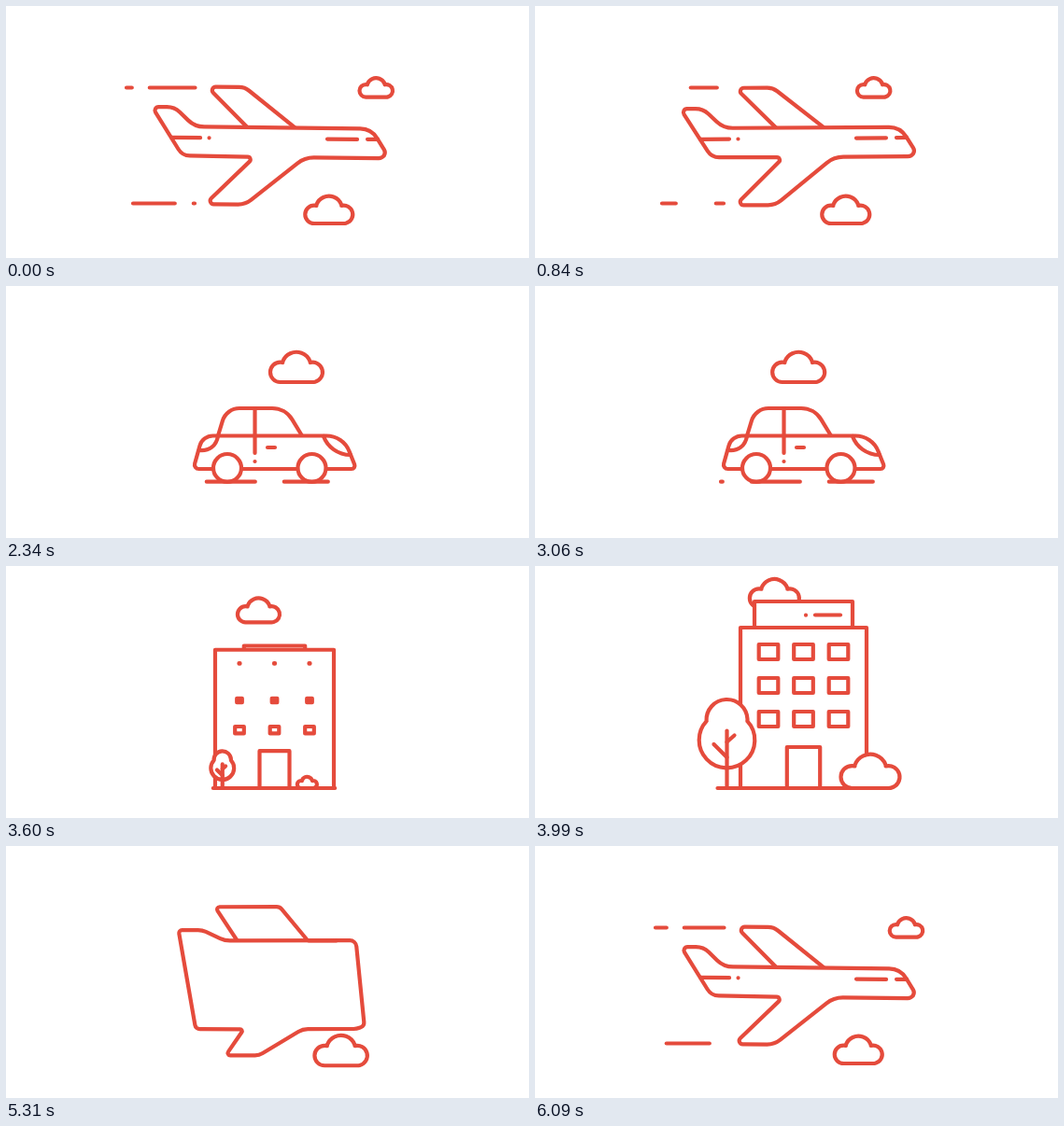
These frames come from a looping animation (560x270 px, 6120 ms). An HTML page with a canvas:

```html
<!DOCTYPE html>
<html lang="en">
<head>
<meta charset="utf-8">
<title>Plane, car, building</title>
<style>
html, body { margin: 0; width: 100%; height: 100%; overflow: hidden; background: #fff; }
canvas { display: block; width: 560px; height: 270px; }
</style>
</head>
<body>
<canvas id="stage"></canvas>
<script>
const LOOP = 6120, INK = '#e54b3c', WEIGHT = 4.2, WIND_SPEED = .2;
const canvas = document.getElementById('stage');
const ctx = canvas.getContext('2d');
const dpr = window.devicePixelRatio || 1;
canvas.width = 560 * dpr;
canvas.height = 270 * dpr;

const clamp = v => Math.max(0, Math.min(1, v));
const easeIn = p => p * p;
const easeOut = p => p * (2 - p);
const easeInOut = p => p * p * (3 - 2 * p);
const mix = (a, b, p) => Array.isArray(a) ? a.map((v, i) => mix(v, b[i], p)) : a + (b - a) * p;

// Every morphing part shares these phases and has one pose for each name.
const PHASES = [
  [0, 'plane'], [1340, 'plane'], [1530, 'wedge', easeIn], [1830, 'car', easeOut],
  [3230, 'car'], [3600, 'block', easeInOut], [3800, 'tower', easeOut],
  [5050, 'tower'], [5540, 'plane', easeInOut], [LOOP, 'plane']
];

function pose(part, t) {
  const i = Math.max(1, PHASES.findIndex(phase => phase[0] >= t));
  const [t0, from] = PHASES[i - 1], [t1, to, ease = easeInOut] = PHASES[i];
  return mix(part[from], part[to], ease(clamp((t - t0) / (t1 - t0))));
}

// 0..1 presence of a part that enters at a and leaves at b, also across the loop end.
function show(t, a, b, enter = 200, leave = 180) {
  if (b < a) b += LOOP;
  const s = t < b - LOOP + leave ? t + LOOP : t;
  return easeOut(clamp((s - a) / enter)) * (1 - clamp((s - b) / leave));
}

// A four-sided body with spare corners along its edges, to match the plane's corners.
function slab(top, bottom, tl, tr, br, bl, round = [0, 0, 0, 0]) {
  const edge = (x1, x2, y, stops) => stops.map(p => [mix(x1, x2, p), y, 0]);
  return [
    [tl, top, round[0]], ...edge(tl, tr, top, [.2, .4]), [tr, top, round[1]],
    [br, bottom, round[2]], ...edge(br, bl, bottom, [.1, .3, .5, .7, .85]), [bl, bottom, round[3]]
  ];
}

const roof = (base, top, x1, x2, x3, x4, left = 0, right = left) =>
  [[x1, base, 0], [x2, top, left], [x3, top, right], [x4, base, 0]];

// Corners are [x, y, length of the rounding along each side].
const BODY = {
  plane: [[156, 109.3, 7], [180, 109.3, 8], [202, 130.2, 10], [391, 130.5, 12], [407, 156, 7], [403, 162, 6],
    [320, 162, 10], [257, 213, 8], [214, 213, 9], [266, 162, 7], [189, 161.3, 8]],
  wedge: slab(138.3, 170, 219.5, 346, 362, 206.5, [6, 12, 10, 7]),
  car: slab(160.5, 196, 210.5, 361, 375, 200.5, [11, 18, 5, 6]),
  block: slab(90, 238, 224, 351, 351, 224),
  tower: slab(66, 238, 220, 355, 355, 220)
};
const ROOF = {
  plane: roof(130, 87.3, 258, 215, 255, 309, 9, 6),
  wedge: roof(138, 107.5, 249, 263, 297, 316, 9),
  car: roof(160.5, 131, 227, 236, 299, 317, 14),
  block: roof(90, 86, 255, 255, 320, 320),
  tower: roof(66, 38, 235, 235, 340, 340)
};
// [centre x before drifting, base y, width]
const CLOUD = {
  plane: [396.3, 97.6, 35.5], wedge: [406, 109.5, 77], car: [404.6, 103, 56],
  block: [414.5, 60.5, 45], tower: [416, 44.5, 53]
};
// One dash serves as window, door handle and sign: [x1, x2, y, weight].
const DASH = {
  plane: [344, 376, 142, 1], wedge: [264.5, 267.5, 150, 1], car: [280, 288, 173, 1],
  block: [313, 313, 52.5, 0], tower: [300, 327, 52.5, 1]
};

function paint() {
  ctx.fill();
  ctx.stroke();
}

function outline(points, closed) {
  const n = points.length;
  ctx.beginPath();
  points.forEach(([x, y, d], i) => {
    const [px, py] = points[(i + n - 1) % n], [nx, ny] = points[(i + 1) % n];
    const a = Math.hypot(px - x, py - y) || 1, b = Math.hypot(nx - x, ny - y) || 1;
    const cut = Math.min(d, a * .55, b * .55);
    const cos = ((px - x) * (nx - x) + (py - y) * (ny - y)) / (a * b);
    if (i === 0) ctx.moveTo(x + (px - x) * cut / a, y + (py - y) * cut / a);
    if (cut < .1 || cos < -.999) ctx.lineTo(x, y);
    else ctx.arcTo(x, y, nx, ny, cut * Math.sqrt((1 - cos) / (1 + cos + 1e-6)));
  });
  if (closed) ctx.closePath();
  paint();
}

function line(x1, y1, x2, y2, weight = 1) {
  if (weight < .02) return;
  ctx.lineWidth = WEIGHT * weight;
  ctx.beginPath();
  ctx.moveTo(x1, y1);
  ctx.lineTo(x2, y2);
  ctx.stroke();
  ctx.lineWidth = WEIGHT;
}

const dot = (x, y, p) => line(x, y, x + .01, y, p);

// Draws the first part p of a path with the given length.
function trim(d, length, p) {
  if (p < .01) return;
  ctx.setLineDash(p < 1 ? [length * p, 999] : []);
  ctx.stroke(new Path2D(d));
  ctx.setLineDash([]);
}

// Dashes that enter at the right end and run left; head is the tip of the first one.
function stream(y, left, right, head, pattern, weight) {
  const x = Math.max(left, head);
  if (x >= right) return;
  ctx.setLineDash(pattern);
  ctx.lineDashOffset = x - head;
  line(x, y, right, y, weight);
  ctx.setLineDash([]);
  ctx.lineDashOffset = 0;
}

function box(x, y, w, h) {
  if (w < .2) return;
  ctx.beginPath();
  ctx.rect(x - w / 2, y - h / 2, w, h);
  paint();
}

function cloud(x, y, w) {
  if (w < .5) return;
  const lobe = w * .19, side = w * .31;
  ctx.beginPath();
  ctx.arc(x - side, y - lobe, lobe, Math.PI / 2, Math.PI * 1.58);
  ctx.arc(x, y - w * .295, w * .28, Math.PI + .35, -.35);
  ctx.arc(x + side, y - lobe, lobe, -Math.PI * .58, Math.PI / 2);
  ctx.closePath();
  paint();
}

function wheel(x, p) {
  if (p < .02) return;
  ctx.beginPath();
  ctx.arc(x, 195, 15 * p, 0, Math.PI * 2);
  paint();
}

function tree(p) {
  if (p < .02) return;
  const x = 205.5 + 45 * (1 - p);
  const X = v => x + v * p, Y = v => 238 - v * p;
  ctx.beginPath();
  ctx.arc(x, Y(73), 22 * p, Math.PI - .05, .05);
  ctx.arc(x, Y(51.5), 29.8 * p, -.75, Math.PI + .75);
  ctx.closePath();
  paint();
  line(x, 238, x, Y(61.5));
  line(X(-14), Y(47), x, Y(33));
  line(X(8), Y(56.5), x, Y(49.5));
}

function drawWind(flight, p) {
  const run = flight * WIND_SPEED;
  stream(87.5, 129, 202.5, 112 - run, [23, 19, 120, 61, 28, 40], p);
  stream(211.5, 136, 202, 135 - run, [46, 20, 118, 43], p);
}

function drawPlane(t, flight) {
  const p = show(t, 5480, 1300);
  // The plane sways a little around its middle.
  const sway = (.08 + .5 * Math.cos(Math.PI * flight / 840)) * show(t, 5200, 1300, 400, 220);
  ctx.save();
  ctx.translate(287, 146);
  ctx.rotate(sway * Math.PI / 180);
  ctx.translate(-287, -146);
  outline(pose(ROOF, t), false);
  outline(pose(BODY, t), true);
  line(177, 142, mix(177, 208, p), 142, p);
  dot(217.5, 142, p);
  line(387, 141.8, mix(387, 398, p), 141.8, p);
  const [x1, x2, y, weight] = pose(DASH, t);
  line(x1, y, x2, y, weight);
  ctx.restore();
}

function drawCar(t) {
  const p = show(t, 1640, 3180);
  trim('M207 176 C218 177 225 171 227 161', 26, p);
  trim('M340 161 C344 172 355 181 369 181', 36, p);
  trim('M266.5 131 V179', 48, p);
  dot(266.5, 188, p);
  wheel(237, p);
  wheel(327.5, p);
  const head = 215 - (t - 2340) * WIND_SPEED;
  stream(209.7, 199, 372, head, [52, 31, 47, 31], show(t, 1800, 3180, 30));
}

function drawBuilding(t) {
  for (let row = 0; row < 3; row++) {
    const p = show(t, 3520 + (2 - row) * 37, 5040, 300);
    const y = 92 + row * 36 + (row ? 22 : 13) * (1 - p);
    for (let col = 0; col < 3; col++) box(250 + col * 37.5, y, 20.6 * p, 16 * p);
  }
  const door = show(t, 3380, 5040, 320);
  box(287.5, 238 - 22 * door, 35.4 * door, 44 * door);
  dot(290, 52.7, show(t, 3740, 5040));
  const ground = show(t, 3600, 5040, 300);
  if (ground > 0) line(mix(222, 195.5, ground), 238, mix(352, 380, ground), 238);
  tree(show(t, 3490, 5040, 470));
}

function drawCloud(t, flight) {
  const [x, y, w] = pose(CLOUD, t);
  const p = show(t, 5480, 4980);
  cloud(x - flight * .04, y - w * .28 * (1 - p), w * p);
}

// The low cloud shrinks away, then grows back as the bush and takes off again.
function drawBush(t, flight) {
  const grow = show(t, 3520, LOOP, 440);
  const bush = [304 + 55 * grow, 238, 63 * grow];
  cloud(...pose({
    plane: [345.8 - flight * .0155, 233, 51], wedge: [325.5, 219.5, 2.5], car: [325, 219, 0],
    block: bush, tower: bush
  }, t));
}

function draw(t) {
  const flight = t > 5200 ? t - LOOP : t;
  ctx.setTransform(dpr, 0, 0, dpr, 0, 0);
  ctx.fillStyle = '#fff';
  ctx.fillRect(0, 0, 560, 270);
  ctx.strokeStyle = INK;
  ctx.lineWidth = WEIGHT;
  ctx.lineCap = ctx.lineJoin = 'round';

  drawCloud(t, flight);
  drawWind(flight, show(t, 5690, 1290, 20, 240));
  drawPlane(t, flight);
  drawCar(t);
  drawBuilding(t);
  drawBush(t, t > 5000 ? t - LOOP : t);
}

const start = performance.now();
function tick() {
  draw((performance.now() - start) % LOOP);
  requestAnimationFrame(tick);
}
tick();
</script>
</body>
</html>
```
